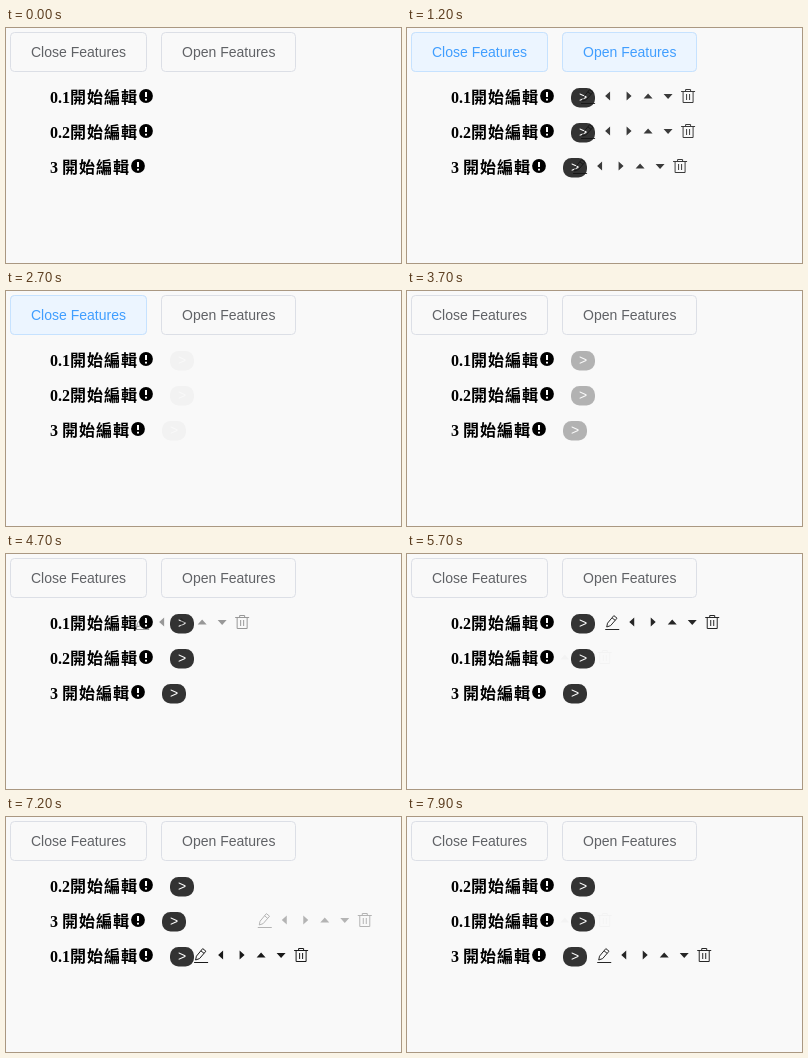
Animation of 395x235 px, one loop 8000 ms. Source, as an HTML page:

```html
<!DOCTYPE html>
<html lang="zh-Hant">
<head>
<meta charset="utf-8">
<title>Toolbar features</title>
<style>
  html, body { margin: 0; width: 100%; height: 100%; overflow: hidden; background: #f9f9f9; }
  svg { display: block; width: 395px; height: 235px; }
  .btn, .pill { font: 14px "Liberation Sans", Arial, sans-serif; }
  .label { font: bold 16px "Liberation Serif", "Noto Sans CJK TC", serif; white-space: pre; }
  .han { letter-spacing: 1px; }
</style>
</head>
<body>
<svg id="stage" viewBox="0 0 395 235">
  <defs>
    <g id="tools" fill="#111">
      <g fill="none" stroke="#111">
        <path d="M189 75.5H203M190.5 73L191.3 69.2 197.6 61.6 200.8 64.2 194.4 71.6ZM195.8 63.8L199 66.4"/>
        <path d="M289 63.5H303M293.5 63.5V61.5H298.5V63.5M291 63.5V74.5H301V63.5M294.5 66V72M297.5 66V72"/>
      </g>
      <path d="M213 68L218 63.5V72.5ZM239.5 68L234.5 63.5V72.5ZM251.5 70.5H260.5L256 65.5ZM271.5 66H280.5L276 71Z"/>
    </g>
  </defs>
</svg>
<script>
const LOOP = 8000, STEP = 100;
const stage = document.getElementById('stage');

function add(parent, tag, attrs, text) {
  const el = document.createElementNS('http://www.w3.org/2000/svg', tag);
  for (const k in attrs) el.setAttribute(k, attrs[k]);
  if (text) el.textContent = text;
  return parent.appendChild(el);
}

const ramp = (t, start, length) => Math.min(1, Math.max(0, (t - start) / length));

function button(x, width, text, on, off) {
  const face = (fill, stroke, color) => {
    const g = add(stage, 'g', { class: 'btn' });
    add(g, 'rect', { x: x + .5, y: 4.5, width: width - 1, height: 39, rx: 4, fill, stroke });
    add(g, 'text', { x: x + 21, y: 29, fill: color }, text);
    return g;
  };
  face('#f9f9f9', '#dcdfe6', '#606266');
  return { hover: face('#ecf5ff', '#c6e2ff', '#409eff'), on, off };
}

const buttons = [
  button(4, 137, 'Close Features', 1000, 3300),
  button(155, 135, 'Open Features', 0, 1200)
];

function makeRow(i) {
  const g = add(stage, 'g', { transform: `translate(0 ${35 * i})` });
  const label = add(g, 'text', { class: 'label', x: 44, y: 75 });
  const name = add(label, 'tspan', {});
  add(label, 'tspan', { class: 'han' }, '開始編輯');
  const rest = add(g, 'g', {});
  add(rest, 'circle', { cx: 140, cy: 68, r: 6.9 });
  add(rest, 'path', { d: 'M140 64V69M140 70.8V72.6', stroke: '#fff', 'stroke-width': 2 });
  const pill = add(rest, 'g', { class: 'pill' });
  add(pill, 'rect', { x: 164, y: 60, width: 24, height: 19.5, rx: 8.5, fill: '#333' });
  add(pill, 'text', { x: 176, y: 74, fill: '#fff', 'text-anchor': 'middle' }, '>');
  const tools = add(rest, 'use', { href: '#tools' });
  return { toggles: [900, 1800], name, rest, pill, tools };
}

const rows = [0, 1, 2].map(makeRow);

// Each move swaps two items: the toolbar closes in one row and opens in the other
const moves = [[5700, 0, 1], [6800, 1, 2], [7900, 2, 1]];
rows[0].toggles.push(4500);
for (const [time, from, to] of moves) {
  rows[from].toggles.push(time);
  rows[to].toggles.push(time);
}

function namesAt(t) {
  const names = ['0.1', '0.2', '3 '];
  for (const [time, a, b] of moves)
    if (t >= time) [names[a], names[b]] = [names[b], names[a]];
  return names;
}

// Returns the toolbar's [shift, opacity]
function toolbar(t, toggles) {
  const past = toggles.filter(s => s <= t);
  if (!past.length) return [0, 0];
  const since = t - past[past.length - 1];
  if (past.length % 2) {
    const p = ramp(since, 0, 900);
    const away = 1 / (1 + Math.exp(16.5 * (p - .243)));
    return [-100 * away - 4 * Math.sin(4 * Math.PI * p), 1 - away];
  }
  const p = ramp(since, -60, 650);
  return [100 * p, 1 - p];
}

function draw(t) {
  for (const { hover, on, off } of buttons)
    hover.setAttribute('opacity', ramp(t, on, 200) - ramp(t, off, 200));
  const pillFade = ramp(t, 0, 400) - .97 * (ramp(t, 2400, 300) - ramp(t, 3600, 300));
  const names = namesAt(t);
  rows.forEach((row, i) => {
    const [x, fade] = toolbar(t, row.toggles);
    row.name.textContent = names[i];
    row.rest.setAttribute('transform', `translate(${names[i] === '3 ' ? -8 : 0} 0)`);
    row.pill.setAttribute('opacity', pillFade);
    row.tools.setAttribute('x', x);
    row.tools.setAttribute('opacity', fade);
  });
}

const start = performance.now();
function tick() {
  const t = (performance.now() - start) % LOOP;
  draw(Math.floor(t / STEP) * STEP);
  requestAnimationFrame(tick);
}
tick();
</script>
</body>
</html>
```
